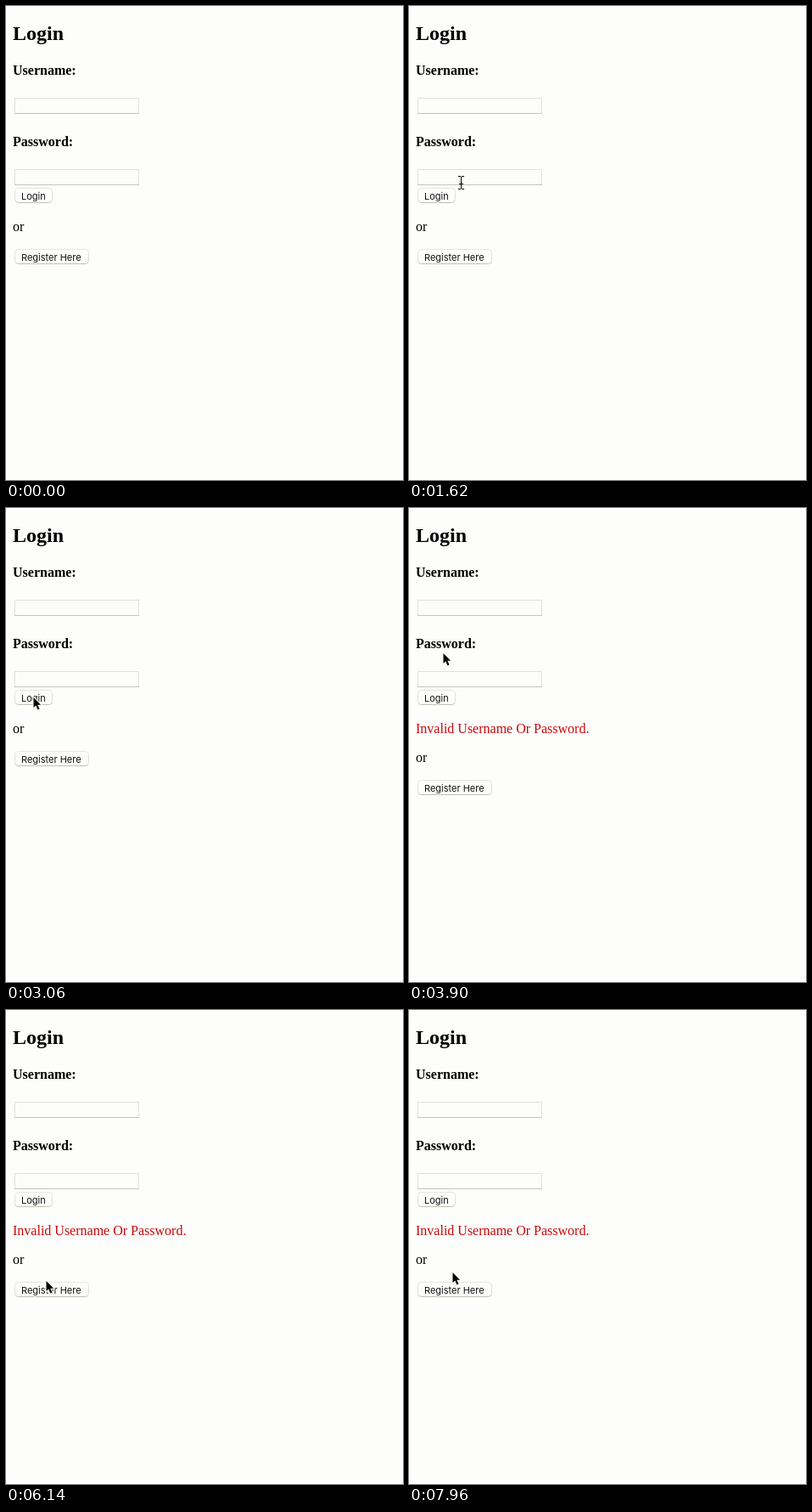
Write an HTML page with a canvas that moves like this. It is 468 by 558 pixels and loops after 8 s.

```html
<!DOCTYPE html>
<html lang="en">
<head>
<meta charset="utf-8">
<title>Login form</title>
<style>
html, body { margin: 0; width: 100%; height: 100%; overflow: hidden; background: #fdfdfc; }
canvas { display: block; width: 468px; height: 558px; }
</style>
</head>
<body>
<canvas id="stage" width="468" height="558"></canvas>
<script>
const ctx = document.getElementById('stage').getContext('2d');
const LOOP = 8000;
const ERROR_AT = 3600;
const PAGE = '#fdfdfc';
const SERIF = '"Liberation Serif", serif';
const SANS = 'Inter, sans-serif';
const FIELD = { x: 10, w: 147, h: 19, tops: [108, 192] };

// Places where the pointer rests; it eases from one to the next.
const stops = [
  { t: 20, x: 424, y: 284 },
  { t: 960, x: 103, y: 126 },
  { t: 2080, x: 36, y: 256 },
  { t: 3000, x: 32, y: 222 },
  { t: 3500, x: 32, y: 222 },
  { t: 3900, x: 40, y: 170 },
  { t: 4880, x: 34, y: 224 },
  { t: 5400, x: 46, y: 124 },
  { t: 6000, x: 47, y: 318 },
  { t: 6840, x: 49, y: 318 },
  { t: LOOP, x: 51, y: 308 }
];

const ease = k => k * k * (3 - 2 * k);
const mix = (a, b, k) => Math.round(a + (b - a) * k);

function pointerAt(t) {
  const i = stops.findIndex(s => s.t > t);
  if (i < 1) return null;
  const a = stops[i - 1], b = stops[i];
  const k = ease((t - a.t) / (b.t - a.t));
  return { x: mix(a.x, b.x, k), y: mix(a.y, b.y, k) };
}

function text(str, x, y, font, color = '#000') {
  ctx.font = font;
  ctx.fillStyle = color;
  ctx.fillText(str, x, y);
}

function bar(x, y, w, h, color) {
  ctx.fillStyle = color;
  ctx.fillRect(x, y, w, h);
}

function field(y) {
  const { x, w, h } = FIELD;
  bar(x, y, w, h, '#e2e2da');
  bar(x + 1, y + 1, w - 2, h - 2, PAGE);
  bar(x, y + h - 1, w, 1, '#c4c4c0');
}

function button(label, y, w) {
  const edge = ctx.createLinearGradient(0, y, 0, y + 18);
  edge.addColorStop(0, '#e6e6de');
  edge.addColorStop(0.8, '#deded4');
  edge.addColorStop(1, '#bcbcb0');
  ctx.strokeStyle = edge;
  ctx.lineWidth = 1;
  ctx.beginPath();
  ctx.roundRect(10.5, y + 0.5, w - 1, 17, 4);
  ctx.stroke();
  text(label, 18, y + 14, '11px ' + SANS, '#111');
}

function arrow({ x, y }) {
  ctx.save();
  ctx.translate(x + 0.5, y + 1);
  const shape = new Path2D('M0 0V12L2.8 9.4L5 14.5L7 13.6L4.8 8.7H8.6Z');
  ctx.strokeStyle = '#fff';
  ctx.lineWidth = 2;
  ctx.stroke(shape);
  ctx.fillStyle = '#000';
  ctx.fill(shape);
  ctx.restore();
}

function beam({ x, y }) {
  bar(x, y - 7, 1, 14, '#000');
  bar(x - 2, y + 1, 5, 1, '#000');
  for (const end of [-8, 7]) {
    bar(x - 3, y + end, 3, 1, '#000');
    bar(x + 1, y + end, 3, 1, '#000');
  }
}

function inField({ x, y }) {
  return x >= FIELD.x && x < FIELD.x + FIELD.w &&
    FIELD.tops.some(top => y >= top && y < top + FIELD.h);
}

function draw(t) {
  bar(0, 0, 468, 558, PAGE);
  text('Login', 8, 40, 'bold 24px ' + SERIF);
  ['Username:', 'Password:'].forEach((label, i) => {
    const top = FIELD.tops[i];
    text(label, 8, top - 27, 'bold 16px ' + SERIF);
    field(top);
  });
  button('Login', 214, 45);

  const failed = t >= ERROR_AT;
  const shift = failed ? 34 : 0;
  if (failed) text('Invalid Username Or Password.', 8, 265, '16px ' + SERIF, '#c80808');
  text('or', 8, 265 + shift, '16px ' + SERIF);
  button('Register Here', 286 + shift, 88);

  const pointer = pointerAt(t);
  if (pointer) (inField(pointer) ? beam : arrow)(pointer);
}

const start = performance.now();
function tick() {
  draw((performance.now() - start) % LOOP);
  requestAnimationFrame(tick);
}
tick();
</script>
</body>
</html>
```
